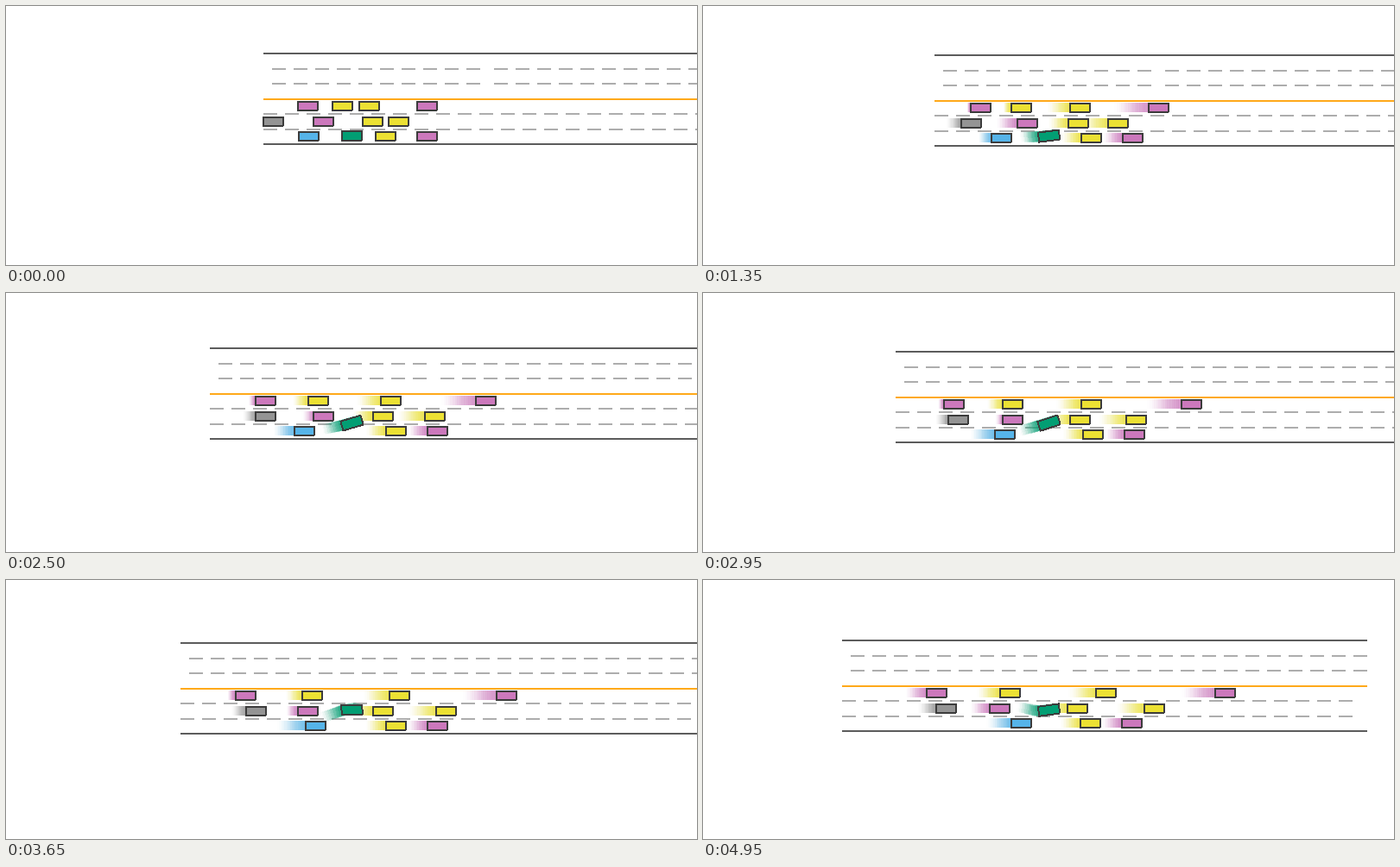
A matplotlib script that plays this animation: 800x300 px, repeating every 5000 ms.

```python
import numpy as np
import matplotlib.pyplot as plt
from matplotlib.animation import FuncAnimation
from matplotlib.collections import PolyCollection
from matplotlib.colors import to_rgb

W, H, FRAMES, INTERVAL = 800, 300, 100, 50
TRAIL = 16           # frames until a ghost has faded out
GHOST_ALPHA = 0.2
ROAD_LEN, DASH, PERIOD = 608, 16, 25
START_X, START_Y = 298, 54

SOLID, DASHED, CENTRE, OUTLINE = "#5c5c5c", "#adadad", "#ffa91a", "#3c3c3c"
PINK, YELLOW, BLUE = "#cc78bc", "#ece133", "#56b4e9"
GREY, GREEN = "#949494", "#029e73"

t = np.arange(FRAMES)


def eased(times, values):
    """Cosine easing from one key point to the next."""
    times, values = np.array(times, float), np.array(values, float)
    i = np.clip(np.searchsorted(times, t, side="right") - 1, 0, len(times) - 2)
    u = (t - times[i]) / (times[i + 1] - times[i])
    return values[i] + (values[i + 1] - values[i]) * (1 - np.cos(np.pi * u)) / 2


def drive(start, end, *waves):
    """Steady drive from start to end, with slow harmonics on top."""
    u = t / (FRAMES - 1)
    x = start + (end - start) * u
    return x + sum(a * np.sin(k * np.pi * u) for k, a in enumerate(waves, 1))


def box(x, y, w, h):
    return np.array([(x, y), (x + w, y), (x + w, y + h), (x, y + h)], float)


def turn(points, degrees, centre):
    a = np.radians(-degrees)
    rot = np.array([[np.cos(a), -np.sin(a)], [np.sin(a), np.cos(a)]])
    return (points - centre) @ rot.T + centre


# The green car pulls away, then steers; the camera follows it.
travel = 1.244 * t + 0.00195 * t ** 2 - 5.3 * (1 - np.exp(-t / 4.3))
heading = eased([0, 62, 65, 79, 87, 99], [0, 18, 18, -10, -10, 8])
climb = np.cumsum(np.gradient(travel) * np.tan(np.radians(heading)))
shift_x = -np.round(travel)
shift_y = np.round(0.4 + climb)

# Traffic: colour, top of the car, its drive along the road.
TOP, MIDDLE, BOTTOM = 110, 128, 145
cars = [
    (PINK, TOP, drive(337, 395, -19.6, 3, -3)),
    (YELLOW, TOP, drive(377, 480, -20.9, -2, -2.4)),
    (YELLOW, TOP, drive(408, 591, -5.2, 0.5)),
    (PINK, TOP, drive(475, 729, 1.5)),
    (GREY, MIDDLE, drive(297, 406, -2, 3.1)),
    (PINK, MIDDLE, drive(355, 468, 2.8, 6, -2.5, -1.8)),
    (YELLOW, MIDDLE, drive(412, 558)),
    (YELLOW, MIDDLE, drive(442, 647)),
    (BLUE, BOTTOM, drive(338, 493, -19.9, -3.4, 1.8)),
    (YELLOW, BOTTOM, drive(427, 573)),
    (PINK, BOTTOM, drive(475, 621)),
]
EGO = (388, 144.6)
EGO_CENTRE = np.array([400.5, 150.6])

# Car parts relative to the top left corner; the outline lacks one corner pixel.
BODY = np.array([(0, 0), (25, 0), (25, 11), (24, 11), (24, 12), (0, 12)], float)
PAINT = box(2, 2, 21, 8)
GHOST = box(0, 0, 24, 11)


def build_road():
    shapes, colours = [], []

    def add(x, y, length, colour):
        shapes.append(box(x, y, length, 2))
        colours.append(colour)

    def dashes(x, y, count):
        for k in range(count):
            add(x + PERIOD * k, y, DASH, DASHED)

    for y in (18, 35):
        dashes(10, y, 10)
        dashes(267, y, 14)
    for y in (70, 88):
        dashes(0, y, 24)
    for y, colour in ((0, SOLID), (53, CENTRE), (105, SOLID)):
        add(0, y, ROAD_LEN, colour)
    return shapes, colours


def trails(f):
    shapes, colours = [], []

    def add(shape, colour, lag):
        shapes.append(shape)
        colours.append((*to_rgb(colour), GHOST_ALPHA * (1 - lag / TRAIL)))

    lags = range(min(TRAIL - 1, f), 0, -1)
    for colour, top, xs in cars:
        for lag in lags:
            corner = (np.round(xs[f - lag]) + shift_x[f], top + shift_y[f])
            add(GHOST + corner, colour, lag)
    for lag in lags:
        p = f - lag
        move = (shift_x[f] - shift_x[p], shift_y[f] - shift_y[p])
        add(turn(GHOST + EGO, heading[p], EGO_CENTRE) + move, GREEN, lag)
    return shapes, colours


def bodies(f):
    shapes = []
    for _, top, xs in cars:
        corner = (np.round(xs[f]) + shift_x[f], top + shift_y[f])
        shapes += [BODY + corner, PAINT + corner]
    shapes += [turn(part + EGO, heading[f], EGO_CENTRE)
               for part in (BODY, PAINT)]
    return shapes


fig = plt.figure(figsize=(W / 100, H / 100), dpi=100, facecolor="white")
ax = fig.add_axes([0, 0, 1, 1])
ax.set(xlim=(0, W), ylim=(H, 0))
ax.axis("off")


def layer(z, colours="none"):
    shapes = PolyCollection([], facecolors=colours, edgecolors="none",
                            linewidths=0, antialiaseds=False, zorder=z)
    shapes.set_snap(False)
    return ax.add_collection(shapes, autolim=False)


road_shapes, road_colours = build_road()
paint = [c for car in cars for c in (OUTLINE, car[0])] + [OUTLINE, GREEN]
road_layer = layer(1, road_colours)
trail_layer = layer(2)
car_layer = layer(3, paint)


def draw(f):
    origin = (START_X + shift_x[f], START_Y + shift_y[f])
    road_layer.set_verts([s + origin for s in road_shapes])
    shapes, colours = trails(f)
    trail_layer.set_verts(shapes)
    trail_layer.set_facecolor(colours if colours else "none")
    car_layer.set_verts(bodies(f))
    return road_layer, trail_layer, car_layer


anim = FuncAnimation(fig, draw, frames=FRAMES, interval=INTERVAL,
                     repeat=True, repeat_delay=0, blit=False)
plt.show()
```
